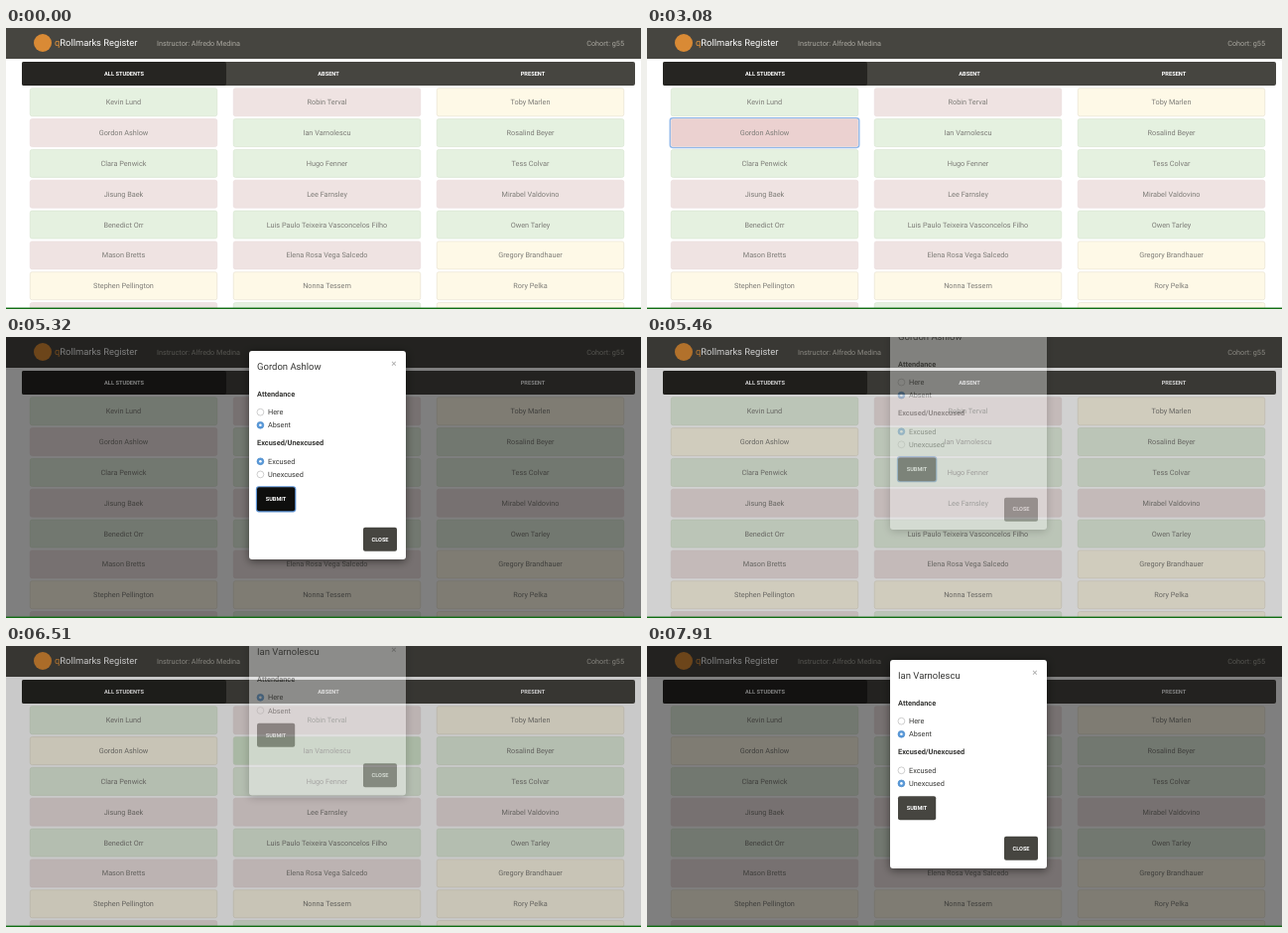
An HTML page for the animation above (8000 ms loop, 640 px wide and 283 px high).

```html
<!DOCTYPE html>
<html lang="en">
<head>
<meta charset="utf-8">
<title>Attendance</title>
<style>
  html, body { margin: 0; width: 100%; height: 100%; overflow: hidden; background: #fff; }
  svg { display: block; width: 640px; height: 283px; font-family: Roboto, "Open Sans", sans-serif; text-rendering: geometricPrecision; }
  .shadow { filter: drop-shadow(0 2px 4px rgba(0, 0, 0, .5)); }
</style>
</head>
<body>
<svg id="stage" viewBox="0 0 640 283"></svg>
<script>
const LOOP = 8000;
const DARK = '#464540', BLACK = '#262522', INK = '#373735';
const TONES = {
  g: { fill: '#e5f1e0', hover: '#d3e8cb', line: '#d5e3cd' },
  p: { fill: '#efe3e2', hover: '#ebd1d0', line: '#e9dada' },
  y: { fill: '#fef9e7', hover: '#f9f1d5', line: '#e6e0cd' }
};
const NAMES = ['Kevin Lund', 'Robin Terval', 'Toby Marlen', 'Gordon Ashlow', 'Ian Varnolescu', 'Rosalind Beyer',
  'Clara Penwick', 'Hugo Fenner', 'Tess Colvar', 'Jisung Baek', 'Lee Farnsley', 'Mirabel Valdovino',
  'Benedict Orr', 'Luis Paulo Teixeira Vasconcelos Filho', 'Owen Tarley', 'Mason Bretts',
  'Elena Rosa Vega Salcedo', 'Gregory Brandhauer', 'Stephen Pellington', 'Nonna Tessem', 'Rory Pelka',
  'Petra Lindow', 'Sasha Kerrin', 'Viktor Amsel'];
const STATUS = 'gpypgggggpppgggppyyyypgy';
const FIRST = 3, SECOND = 4;          // the two students whose dialog opens

const stage = document.getElementById('stage');
const clamp = v => Math.min(1, Math.max(0, v));
const ramp = (t, start, length) => clamp((t - start) / length);
const within = (t, a, b) => t >= a && t < b;
const pulse = (t, a, b, fade = 120) => ramp(t, a, fade) * (1 - ramp(t, b, fade));
const easeOut = u => 1 - Math.pow(1 - u, 1.65);

function set(node, attrs) {
  for (const key in attrs) node.setAttribute(key, attrs[key]);
}
function add(parent, tag, attrs = {}) {
  const node = document.createElementNS('http://www.w3.org/2000/svg', tag);
  set(node, attrs);
  return parent.appendChild(node);
}
const box = (parent, x, y, width, height, fill, rx = 0, more = {}) =>
  add(parent, 'rect', { x, y, width, height, fill, rx, ...more });
function label(parent, text, x, middle, size, fill, more = {}) {
  const node = add(parent, 'text', { x, y: middle + size * .355, 'font-size': size, fill, ...more });
  node.textContent = text;
  return node;
}
const CENTER = { 'text-anchor': 'middle' };
const CAPS = { 'text-anchor': 'middle', 'font-weight': 700 };

// Page header and tabs
box(stage, 0, 0, 640, 283, '#fff');
box(stage, 0, 0, 640, 31, DARK);
add(stage, 'circle', { cx: 37, cy: 15, r: 9, fill: '#d98a35' });
const brand = label(stage, '', 49, 15, 9.35, '#fff');
[['q', '#e8963c'], ['Rollmarks Register', '#fff']].forEach(([text, fill]) => {
  add(brand, 'tspan', { fill }).textContent = text;
});
label(stage, 'Instructor: Alfredo Medina', 152, 15, 7.25, '#a9a79f');
label(stage, 'Cohort: g55', 623, 15, 7.25, '#a9a79f', { 'text-anchor': 'end' });

box(stage, 16, 34, 618, 24, DARK, 2);
const tabs = ['ALL STUDENTS', 'ABSENT', 'PRESENT'].map((text, i) => {
  const shade = box(stage, 16 + 206 * i, 34, 206, 24, BLACK, i === 1 ? 0 : 2);
  label(stage, text, 119 + 206 * i, 45.7, 5.7, '#fff', CAPS);
  return shade;
});

// One student grid per tab
function makeGrid(indices) {
  const group = add(stage, 'g');
  const tiles = {};
  indices.forEach((student, slot) => {
    const x = 24 + 205 * (slot % 3), y = 60.5 + 30.83 * Math.floor(slot / 3);
    const ring = box(group, x - .7, y - .5, 190.4, 29.5, 'none', 2.5, { stroke: '#8fb8ea', 'stroke-width': 1.6 });
    const base = box(group, x + .25, y + .25, 188.5, 28, '', 2, { 'stroke-width': .6 });
    const hover = box(group, x + .5, y + .5, 188, 27.5, '', 2);
    label(group, NAMES[student], x + 94.5, y + 14.1, 7.3, '#7d7c77', CENTER);
    tiles[student] = { ring, base, hover };
  });
  return { group, tiles };
}
const all = NAMES.map((_, i) => i);
const grids = [all, all.filter(i => STATUS[i] !== 'g'), all.filter(i => STATUS[i] === 'g')].map(makeGrid);

// Dialog
const backdrop = box(stage, 0, 0, 640, 282, '#000');
const dialog = add(stage, 'g');
const panel = box(dialog, 245, 14, 158, 210, '#fff', 3, { class: 'shadow' });
const title = label(dialog, '', 253, 29.5, 9.5, INK);
label(dialog, '×', 391, 26.8, 10, '#aaa', CENTER);
label(dialog, 'Attendance', 253, 57.5, 7.4, INK, { 'font-weight': 700 });

function makeRadio(parent, text, y) {
  const ring = add(parent, 'circle', { cx: 256.4, cy: y, r: 3.4, 'stroke-width': .7 });
  const dot = add(parent, 'circle', { cx: 256.4, cy: y, r: 1.3, fill: '#fff' });
  label(parent, text, 264, y, 7.3, INK);
  return (on, pressed) => {
    set(ring, { fill: on ? '#5a9ada' : pressed ? '#d5d5d5' : '#fff', stroke: on ? '#4a88c8' : '#b9b9b9' });
    set(dot, { opacity: on ? 1 : 0 });
  };
}
const here = makeRadio(dialog, 'Here', 75.7);
const absent = makeRadio(dialog, 'Absent', 88.8);
const reasons = add(dialog, 'g');
label(reasons, 'Excused/Unexcused', 253, 106.8, 7.4, INK, { 'font-weight': 700 });
const excused = makeRadio(reasons, 'Excused', 125.3);
const unexcused = makeRadio(reasons, 'Unexcused', 138.4);

const actions = add(dialog, 'g');
const submitRing = box(actions, 252.6, 150.9, 39, 24.8, 'none', 2.4, { stroke: '#5c93d6', 'stroke-width': 1.5 });
const submit = box(actions, 253, 151.3, 38.2, 24, DARK, 2);
label(actions, 'SUBMIT', 272, 163.1, 5.6, '#fff', CAPS);
box(actions, 360, 191.8, 34, 24, DARK, 2);
label(actions, 'CLOSE', 377, 203.6, 5.6, '#fff', CAPS);

box(stage, 0, 281.6, 640, 1.4, '#0f6d12');

// Timing
const OPEN_1 = 3090, CLOSE_1 = 5340, OPEN_2 = 6430, EXPAND = 7420;
const FADE = 190, SLIDE = 300;
const HOVERS = [[0, 2560, 2740], [FIRST, 2760, 3180], [10, 5680, 5920], [7, 5960, 6060], [SECOND, 6080, 6480]];

function drawPage(t) {
  const toAbsent = ramp(t, 280, 220), toPresent = ramp(t, 1120, 220), toAll = ramp(t, 1960, 220);
  const weights = [1 - toAbsent + toAll, toAbsent - toPresent, toPresent - toAll];
  weights.forEach((opacity, i) => {
    set(tabs[i], { opacity });
    set(grids[i].group, { opacity });
  });

  const hovers = {};
  HOVERS.forEach(([student, a, b]) => { hovers[student] = pulse(t, a, b); });
  const focused = within(t, 3010, OPEN_1 + 60) || within(t, CLOSE_1 + SLIDE, 6380) ? FIRST
    : within(t, 6380, OPEN_2 + 40) ? SECOND : -1;
  grids.forEach(({ tiles }) => {
    for (const key in tiles) {
      const student = +key, tile = tiles[key];
      const tone = TONES[student === FIRST && t >= CLOSE_1 ? 'y' : STATUS[student]];
      const focus = student === focused ? 1 : 0;
      set(tile.base, { fill: tone.fill, stroke: tone.line });
      set(tile.hover, { fill: tone.hover, opacity: Math.max(focus, hovers[student] || 0) });
      set(tile.ring, { opacity: focus });
    }
  });
}

function drawDialog(t) {
  const second = t >= OPEN_2;
  const closing = !second && t >= CLOSE_1;
  const start = second ? OPEN_2 : closing ? CLOSE_1 : OPEN_1;
  const fade = ramp(t, start, FADE), slide = easeOut(ramp(t, start, SLIDE));
  const shown = closing ? 1 - fade : fade;
  const settled = closing ? 1 - slide : slide;

  const full = !second || t >= EXPAND;
  const lift = full ? 0 : 49.7;
  const height = 210 - lift;
  set(backdrop, { opacity: shown * .5 });
  set(dialog, { opacity: shown, transform: `translate(0 ${-(1 - settled) * height * .25})` });
  set(panel, { height });
  set(actions, { transform: `translate(0 ${-lift})` });
  set(reasons, { opacity: full ? 1 : 0 });
  title.textContent = NAMES[second ? SECOND : FIRST];

  const isExcused = !second && t >= 4550;
  here(!full, false);
  absent(full, second && t >= 7280);
  excused(isExcused, within(t, 4410, 4550));
  unexcused(!isExcused, false);
  const pressed = !second && t >= 5180;
  set(submit, { fill: pressed ? '#0e0e0d' : DARK });
  set(submitRing, { opacity: !second && t >= 5240 ? 1 : 0 });
}

function tick() {
  const t = performance.now() % LOOP;
  drawPage(t);
  drawDialog(t);
  requestAnimationFrame(tick);
}
tick();
</script>
</body>
</html>
```
